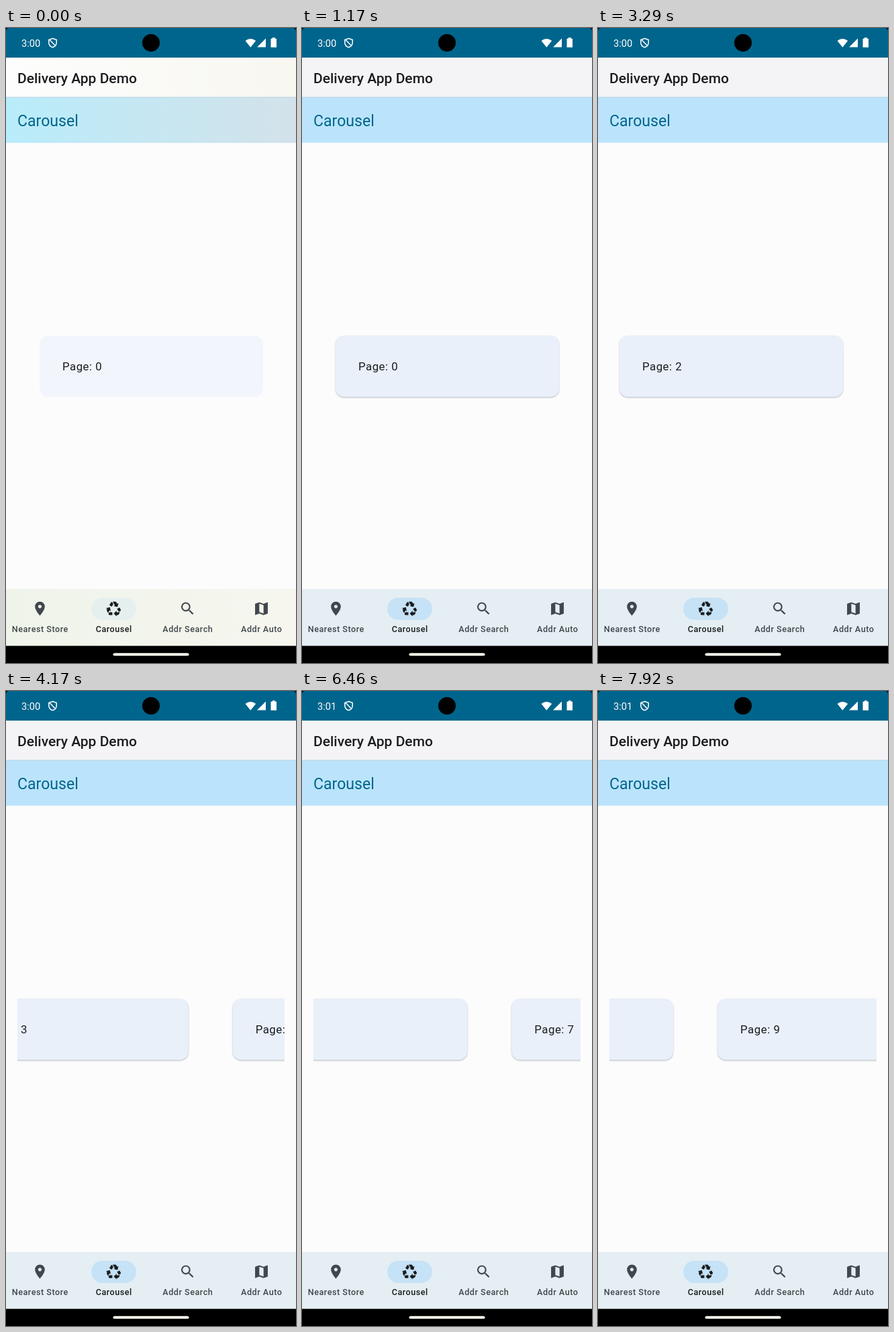
Animation, 432 px wide and 944 px high, one loop 8 s. Source, as an HTML page with a canvas:

```html
<!DOCTYPE html>
<html lang="en">
<head>
<meta charset="utf-8">
<title>Carousel</title>
<style>
html, body { margin: 0; width: 100%; height: 100%; overflow: hidden; background: #000; }
canvas { display: block; width: 100vw; height: 100vh; }
</style>
</head>
<body>
<canvas id="stage" width="432" height="944"></canvas>
<script>
const ctx = document.getElementById('stage').getContext('2d');
const LOOP = 8000, STEP = 1000 / 24, PITCH = 399;
const INK = '#1a1c1e', MUTED = '#41474d', PRIMARY = '#00658c';

// Each swipe moves one page: touch down, release.
const swipes = [
  [1420, 1660], [2380, 2620], [3250, 3410], [3930, 4200], [4890, 4946],
  [5440, 5700], [6420, 6458], [7010, 7200], [7700, 7863]
];
const DRAG = 0.34;   // share of a page covered by the finger
const OMEGA = 0.02;  // settling spring, per ms
const FLING = 0.008; // release speed, pages per ms

const icons = {
  place: 'M12 2C8.13 2 5 5.13 5 9c0 5.25 7 13 7 13s7-7.75 7-13c0-3.87-3.13-7-7-7zm0 9.5c-1.38 0-2.5-1.12-2.5-2.5s1.12-2.5 2.5-2.5 2.5 1.12 2.5 2.5-1.12 2.5-2.5 2.5z',
  recycle: 'M5.77 7.15L7.2 4.78l1.03-1.71c.39-.65 1.33-.65 1.72 0l1.48 2.46-1.23 2.06-1 1.62-3.43-2.06zm15.95 5.82l-1.6-2.66-3.46 2L18.87 16H20c.76 0 1.45-.43 1.79-1.11.14-.28.21-.58.21-.89 0-.36-.1-.71-.28-1.03zM16 21h1.5c.76 0 1.45-.43 1.79-1.11L20.74 17H16v-2l-4 4 4 4v-2zm-6-4H5.7l-.84 1.41c-.3.5-.32 1.12-.06 1.65.28.57.87.94 1.52.94H10v-4zm-3.88-2.65l1.73 1.04L6.48 9.9 1 11.27l1.7 1.02-.41.69c-.35.59-.38 1.31-.07 1.92l1.63 3.26 2.27-3.81zm10.9-9.21l-1.3-2.17C15.35 2.37 14.7 2 14 2h-3.53l3.12 5.2-1.72 1.03 5.49 1.37 1.37-5.49-1.71 1.03z',
  search: 'M15.5 14h-.79l-.28-.27C15.41 12.59 16 11.11 16 9.5 16 5.91 13.09 3 9.5 3S3 5.91 3 9.5 5.91 16 9.5 16c1.61 0 3.09-.59 4.23-1.57l.27.28v.79l5 4.99L20.49 19l-4.99-5zm-6 0C7.01 14 5 11.99 5 9.5S7.01 5 9.5 5 14 7.01 14 9.5 11.99 14 9.5 14z',
  map: 'M20.5 3l-.16.03L15 5.1 9 3 3.36 4.9c-.21.07-.36.25-.36.48V20.5c0 .28.22.5.5.5l.16-.03L9 18.9l6 2.1 5.64-1.9c.21-.07.36-.25.36-.48V3.5c0-.28-.22-.5-.5-.5zM15 19l-6-2.11V5l6 2.11V19z'
};
const tabs = [
  ['Nearest Store', icons.place], ['Carousel', icons.recycle],
  ['Addr Search', icons.search], ['Addr Auto', icons.map]
].map(([label, d]) => ({ label, path: new Path2D(d) }));

const shield = new Path2D('M69.5 15.5L75.2 17.5V22C75.2 25.2 72.8 27.6 69.5 28.8C66.2 27.6 63.8 25.2 63.8 22V17.5ZM65 17.5L73.5 26.5');
const signal = new Path2D('M356.5 19Q364.3 12.8 372.2 19L364.3 28.8ZM387 15.6V28.6H374Z');
const battery = new Path2D('M394.5 15.8H396.8V14.3H400.7V15.8H403V28.8H394.5Z');
const corners = new Path2D('M0 0H5Q0 0 0 5ZM432 0V5Q432 0 427 0Z');

function rect(x, y, w, h, color) {
  ctx.fillStyle = color;
  ctx.fillRect(x, y, w, h);
}

function pill(x, y, w, h, r, color) {
  ctx.fillStyle = color;
  ctx.beginPath();
  ctx.roundRect(x, y, w, h, r);
  ctx.fill();
}

function text(str, x, y, size, color, weight = 400, spacing = 0, align = 'left') {
  ctx.font = `${weight} ${size}px Roboto, sans-serif`;
  ctx.letterSpacing = spacing + 'px';
  ctx.textAlign = align;
  ctx.fillStyle = color;
  ctx.fillText(str, x, y);
}

function tint(y, h, left, right, alpha) {
  const g = ctx.createLinearGradient(0, 0, 432, 0);
  g.addColorStop(0, left);
  g.addColorStop(1, right);
  ctx.globalAlpha = alpha;
  rect(0, y, 432, h, g);
  ctx.globalAlpha = 1;
}

function swipeAt(t, [down, up]) {
  if (t <= down) return 0;
  if (t < up) return DRAG * ((t - down) / (up - down)) ** 1.5;
  const u = t - up, rest = 1 - DRAG;
  const left = (rest + (OMEGA * rest - FLING) * u) * Math.exp(-OMEGA * u);
  return left * PITCH < 0.5 ? 1 : 1 - left;
}

function statusBar(t) {
  rect(0, 0, 432, 44, PRIMARY);
  ctx.fillStyle = '#000';
  ctx.fill(corners);
  text(t < 5750 ? '3:00' : '3:01', 23, 27.5, 14.7, '#fff');
  ctx.strokeStyle = '#fff';
  ctx.lineWidth = 1.5;
  ctx.stroke(shield);
  ctx.fillStyle = '#fff';
  ctx.fill(signal);
  ctx.fill(battery);
  ctx.fillStyle = '#000';
  ctx.beginPath();
  ctx.arc(216, 22, 13, 0, Math.PI * 2);
  ctx.fill();
}

function header(soft) {
  rect(0, 44, 432, 59, '#f4f4f7');
  rect(0, 103, 432, 67.5, '#bbe4fc');
  tint(44, 59, '#fdfdfd', '#f8f7f0', soft);
  tint(103, 67.5, '#b9ecfa', '#d3e2ea', soft);
  rect(0, 102.5, 432, 1, '#b4d3e4');
  text('Delivery App Demo', 17, 81.5, 21, INK, 500);
  text('Carousel', 17, 146, 23.1, PRIMARY);
}

function carousel(t, soft) {
  const pos = swipes.reduce((sum, swipe) => sum + swipeAt(t, swipe), 0);
  const first = Math.floor(pos);
  ctx.save();
  ctx.beginPath();
  ctx.rect(17, 440, 398, 130);
  ctx.clip();
  for (let page = first; page <= first + 1; page++) {
    const x = 50 + (page - pos) * PITCH;
    ctx.globalAlpha = 1 - soft * 0.5;
    ctx.shadowColor = `rgba(40,55,70,${0.35 * (1 - soft)})`;
    ctx.shadowBlur = 2;
    ctx.shadowOffsetY = 1;
    pill(x, 457.5, 333, 91, 12.6, '#e9f0fa');
    ctx.shadowColor = 'transparent';
    ctx.globalAlpha = 1;
    text('Page: ' + page, x + 34, 509, 16.8, INK, 400, 0.525);
  }
  ctx.restore();
}

function navBar(soft) {
  rect(0, 834, 432, 84.5, '#e4eef3');
  tint(834, 84.5, '#eff4ea', '#f6f6ee', soft);
  ctx.globalAlpha = 1 - soft * 0.7;
  pill(127, 847, 67, 33, 16.5, '#c6e2f6');
  ctx.globalAlpha = 1;
  tabs.forEach(({ label, path }, i) => {
    const x = 50.5 + i * 110;
    const color = i === 1 ? INK : MUTED;
    ctx.save();
    ctx.translate(x - 12.6, 850.6);
    ctx.scale(1.05, 1.05);
    ctx.fillStyle = color;
    ctx.fill(path);
    ctx.restore();
    text(label, x + 0.25, 898, 12.6, color, 500, 0.525, 'center');
  });
  rect(0, 918.5, 432, 25.5, '#000');
  pill(159.5, 929.3, 113, 4, 2, '#fffff0');
}

function draw(t) {
  const soft = Math.max(0, 1 - t / 300);
  rect(0, 0, 432, 944, '#fcfcfd');
  statusBar(t);
  header(soft);
  carousel(t, soft);
  navBar(soft);
}

const began = performance.now();
function tick() {
  const t = (performance.now() - began) % LOOP;
  draw(Math.floor((t + 5) / STEP) * STEP);
  requestAnimationFrame(tick);
}
tick();
</script>
</body>
</html>
```
